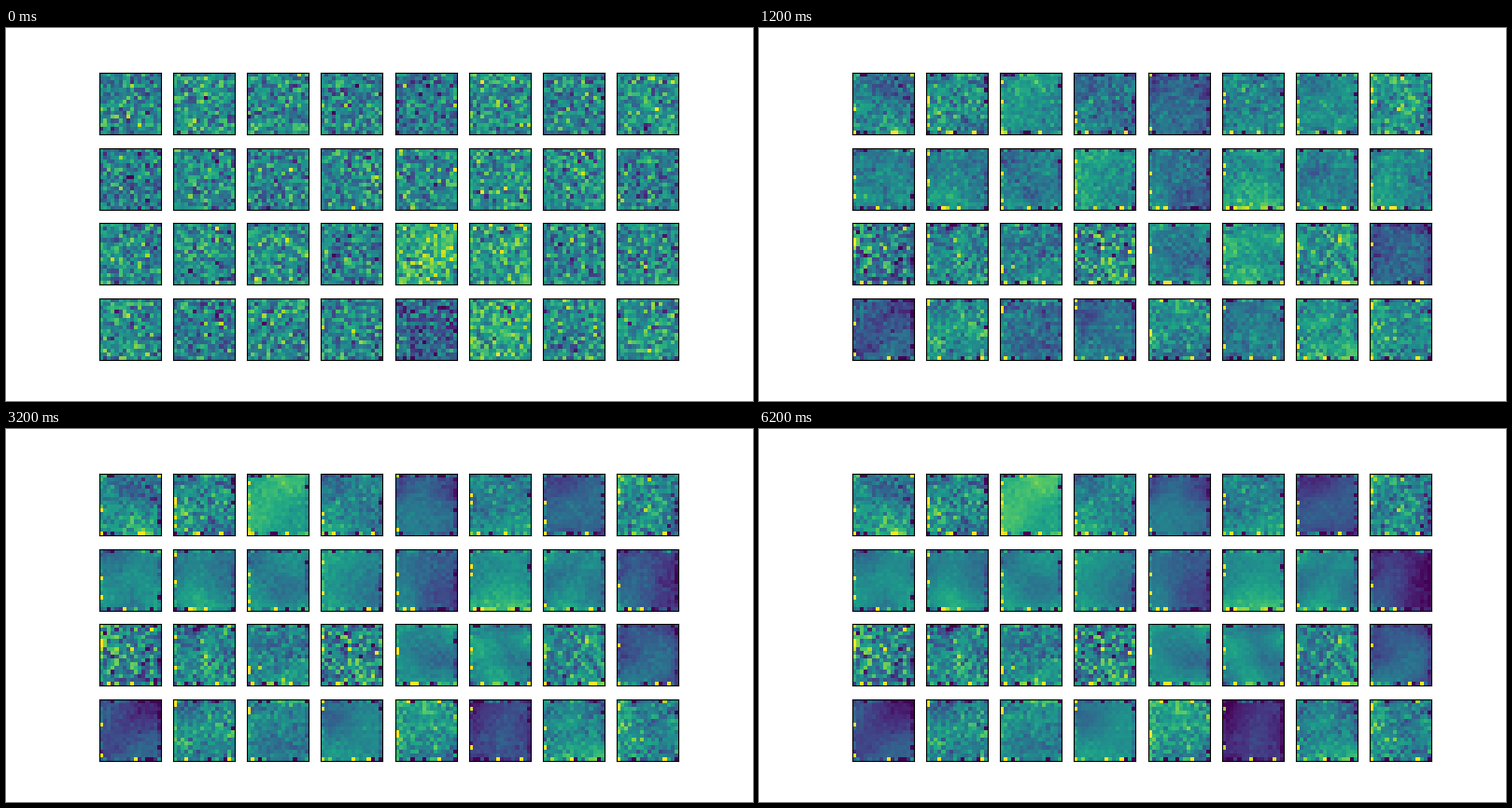
These frames come from a looping animation (800 by 400 pixels, 6400 ms). A matplotlib script:

```python
import numpy as np
import matplotlib.pyplot as plt
from matplotlib.animation import FuncAnimation

FRAMES, INTERVAL = 32, 200
SETTLED = 30          # the weights have converged by this frame
SIZE = 16
ROWS, COLS = 4, 8

# Mean brightness in percent of the panels that stand out, by panel index.
START = {4: 40, 20: 65, 21: 57, 28: 32, 29: 60}
EARLY = {4: 33, 12: 38, 23: 30, 24: 28, 26: 35, 27: 36}
FINAL = {2: 66, 4: 34, 6: 24, 12: 31, 13: 55, 15: 15, 23: 30, 24: 21, 28: 55, 29: 13}
# Panels that stay rough, grouped by the grain they keep.
ROUGH = {19: (16, 19), 13: (1, 7, 17, 22), 10: (0, 18, 25, 28, 31), 7: (3, 5, 26, 30)}
FINE = 2

rng = np.random.default_rng(5)
row, col = np.mgrid[:SIZE, :SIZE]


def unit(field):
    return (field - field.mean()) / field.std()


def grain_field():
    return unit(rng.normal(size=(SIZE, SIZE)))


def soft_field(radius):
    """Random noise blurred by a Gaussian of the given radius."""
    blur = np.exp(-(row - col) ** 2 / (2 * radius ** 2))
    blur /= blur.sum(axis=1, keepdims=True)
    return unit(blur @ rng.normal(size=(SIZE, SIZE)) @ blur.T)


def border_field():
    """Uneven border with bright cells left and below, dark ones above and right."""
    border = np.zeros((SIZE, SIZE))
    border[:, 0] = rng.normal(5, 7, SIZE)
    border[:, -1] = rng.normal(-7, 7, SIZE)
    border[[0, -1]] = rng.normal(0, 13, (2, SIZE))
    border[rng.integers(SIZE, size=2), 0] = 80
    border[-1, rng.integers(SIZE, size=2)] = 80
    border[0, rng.integers(SIZE, size=2)] = -80
    border[-1, rng.integers(SIZE, size=2)] = -80
    border[rng.integers(SIZE), -1] = -80
    return border


class Panel:
    def __init__(self, index):
        self.levels = (START.get(index, rng.normal(48, 3)),
                       EARLY.get(index, rng.normal(48, 5)),
                       FINAL.get(index, 47))
        self.grain = next((g for g, group in ROUGH.items() if index in group), FINE)
        self.initial = grain_field()
        self.kept = grain_field()
        self.patches = soft_field(1)
        self.shape = 6 * soft_field(3.5) + 0.4 * (row - col)
        self.border = border_field()

    def weights(self, frame):
        t = min(frame, SETTLED)
        learned = 1 - np.exp(-t / 1.3)
        fading = np.exp(-t / 7)
        noise = self.grain + max(0, 12 - self.grain) * fading
        trained = (self.border + noise * self.kept + 7 * fading * self.patches
                   + (1 - np.exp(-t / 5)) * self.shape)
        level = np.interp(t, (0, 4, 20), self.levels)
        values = level + (1 - learned) * 16 * self.initial + learned * trained
        return np.clip(values / 100, 0, 1)


fig, axes = plt.subplots(ROWS, COLS, figsize=(8, 4), dpi=100)
panels = [Panel(i) for i in range(ROWS * COLS)]
images = []
for panel, ax in zip(panels, axes.flat):
    images.append(ax.imshow(panel.weights(0), cmap="viridis", vmin=0, vmax=1))
    ax.set(xticks=[], yticks=[])


def update(frame):
    for panel, image in zip(panels, images):
        image.set_data(panel.weights(frame))
    return images


animation = FuncAnimation(fig, update, frames=FRAMES, interval=INTERVAL, repeat=True, repeat_delay=0)
plt.show()
```
